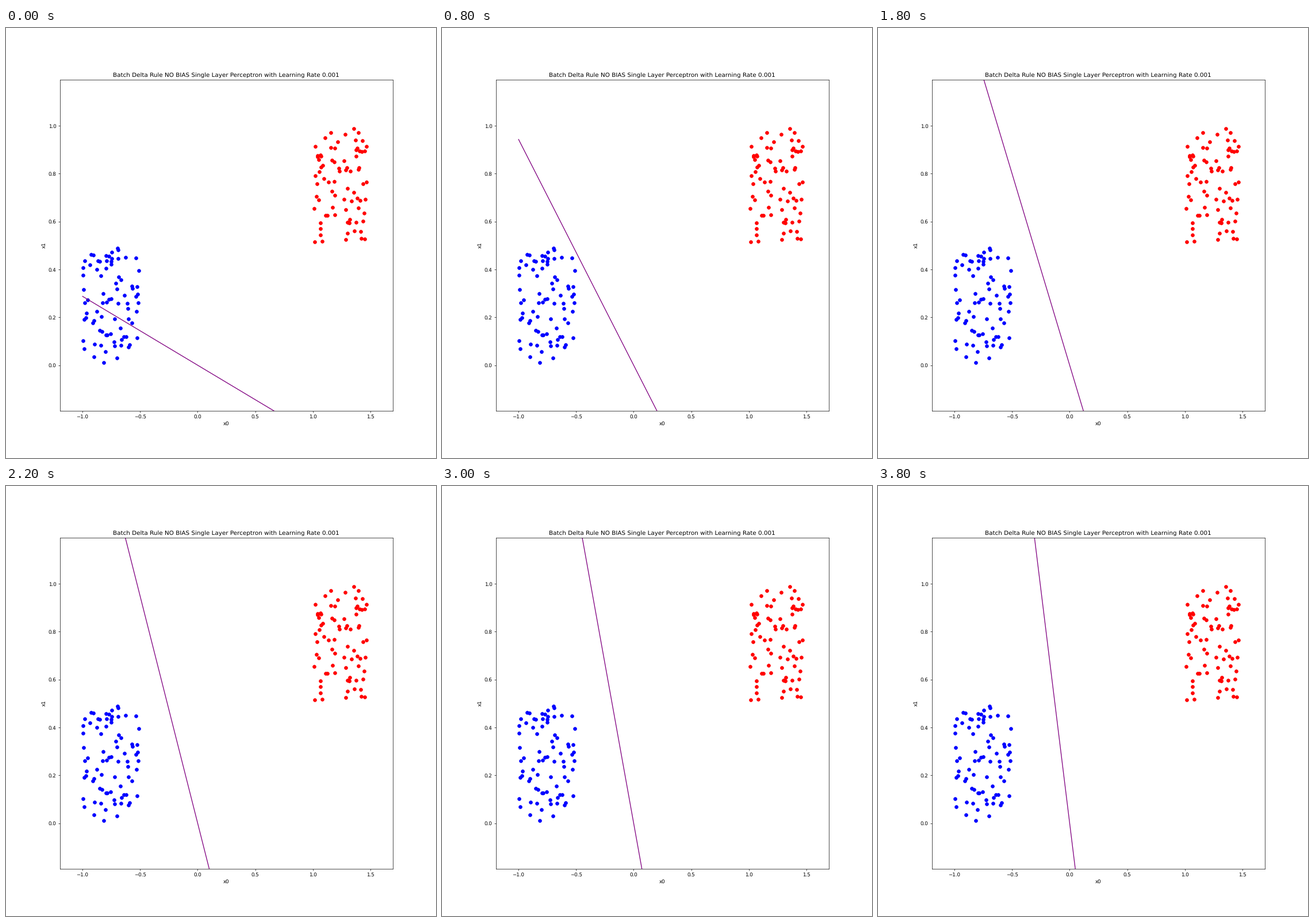
These frames come from a looping animation (748 by 748 pixels, 4 s). A matplotlib script:

```python
import numpy as np
import matplotlib.pyplot as plt
from matplotlib.animation import FuncAnimation

SIZE = 748
FRAMES, INTERVAL = 20, 200
COUNT = 80
RATE = 0.001
START = np.array([0.1469, 0.5096])

# Sums over all samples: inputs with inputs, inputs with labels
GRAM = np.array([[170.62, 58.96], [58.96, 52.68]])
PULL = np.array([158.46, 39.55])

plt.rcParams["text.hinting"] = "none"
rng = np.random.default_rng(7)


def cluster(x, y, color):
    """Scatter samples over a square of side 0.5."""
    pts = rng.uniform((x, y), (x + 0.49, y + 0.485), (COUNT, 2))
    ax.scatter(*pts.T, s=43, color=color)


def train():
    """Weights before each epoch of the batch delta rule."""
    w, history = START, []
    for _ in range(FRAMES):
        history.append(w)
        w = w + RATE * (PULL - GRAM @ w)
    return history


fig, ax = plt.subplots(figsize=(12, 12), dpi=SIZE / 12)
ax.set_title("Batch Delta Rule NO BIAS Single Layer Perceptron "
             "with Learning Rate 0.001")
ax.set_xlabel("x0")
ax.set_ylabel("x1")

cluster(-0.998, 0.01, "blue")
cluster(1.002, 0.505, "red")
line, = ax.plot([], [], color="purple")
ax.set_xlim(-1.196, 1.694)
ax.set_ylim(-0.19, 1.193)

weights = train()
span = np.array([-0.998, 1.492])


def draw(i):
    w0, w1 = weights[i]
    line.set_data(span, -span * w0 / w1)
    return line,


anim = FuncAnimation(fig, draw, frames=FRAMES, interval=INTERVAL,
                     init_func=lambda: draw(0), repeat=True, repeat_delay=0)
plt.show()
```
